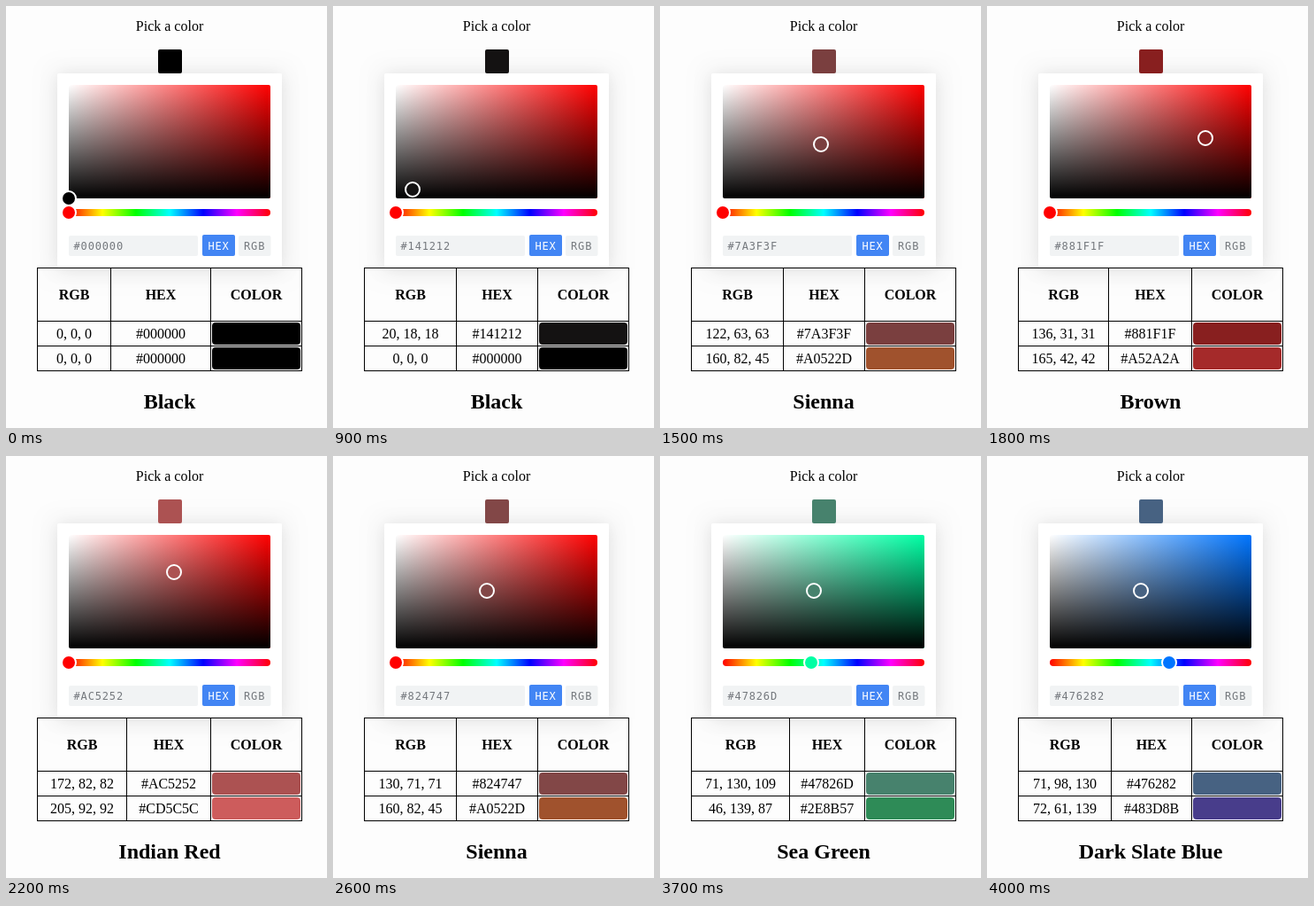
Write an HTML page with a canvas that moves like this. It is 363x476 px and loops after 4100 ms.

```html
<!DOCTYPE html>
<html lang="en">
<head>
<meta charset="utf-8">
<title>Color picker</title>
<style>
  html, body { margin: 0; width: 100%; height: 100%; overflow: hidden; background: #fdfdfd; }
  canvas { display: block; }
</style>
</head>
<body>
<canvas id="stage" width="363" height="476"></canvas>
<script>
const ctx = document.getElementById('stage').getContext('2d');
const LOOP = 4100, STEP = 100;
const SERIF = '"Liberation Serif", "Times New Roman", serif';
const MONO = '"DejaVu Sans Mono", monospace';
const FIELD = { x: 71, y: 89, w: 228, h: 128 };
const HUE_Y = 233;

// [step, saturation, value]
const PATH = [
  [8, 0, 0],
  [13, 41 / 99, 99 / 255],
  [14, 0.39, 0.46],
  [18, 105 / 136, 136 / 255],
  [20, 0.76, 0.62],
  [23, 0.4, 0.7],
  [26, 59 / 130, 130 / 255]
];
// [step, hue in degrees]
const HUES = [
  [32, 0],
  [33, 120 - 60 * 19 / 59],
  [34, 120 - 60 * 19 / 59],
  [37, 120 + 60 * 38 / 59],
  [40, 240 - 60 * 27 / 59]
];
const NAMES = {
  'Black': '#000000', 'Dim Gray': '#696969', 'Gray': '#808080',
  'Dark Slate Gray': '#2F4F4F', 'Slate Gray': '#708090',
  'Maroon': '#800000', 'Dark Red': '#8B0000', 'Brown': '#A52A2A',
  'Fire Brick': '#B22222', 'Indian Red': '#CD5C5C', 'Rosy Brown': '#BC8F8F',
  'Sienna': '#A0522D', 'Saddle Brown': '#8B4513',
  'Dark Olive Green': '#556B2F', 'Olive Drab': '#6B8E23',
  'Forest Green': '#228B22', 'Sea Green': '#2E8B57', 'Teal': '#008080',
  'Cadet Blue': '#5F9EA0', 'Steel Blue': '#4682B4',
  'Dark Slate Blue': '#483D8B', 'Midnight Blue': '#191970'
};

function sample(keys, step) {
  if (step <= keys[0][0]) return keys[0].slice(1);
  for (let i = 1; i < keys.length; i++) {
    const [a, b] = [keys[i - 1], keys[i]];
    if (step <= b[0]) {
      const k = (step - a[0]) / (b[0] - a[0]);
      return a.slice(1).map((v, j) => v + (b[j + 1] - v) * k);
    }
  }
  return keys[keys.length - 1].slice(1);
}

function hsvToRgb(h, s, v) {
  return [5, 3, 1].map(n => {
    const k = (n + h / 60) % 6;
    return Math.round(255 * v * (1 - s * Math.max(0, Math.min(k, 4 - k, 1))));
  });
}

const toHex = rgb => '#' + rgb.map(c => c.toString(16).padStart(2, '0')).join('').toUpperCase();
const fromHex = hex => [1, 3, 5].map(i => parseInt(hex.slice(i, i + 2), 16));

function nearestName(rgb) {
  const dist = name => fromHex(NAMES[name]).reduce((sum, c, i) => sum + (c - rgb[i]) ** 2, 0);
  return Object.keys(NAMES).reduce((best, name) => dist(name) < dist(best) ? name : best);
}

function box(x, y, w, h, r, fill) {
  ctx.beginPath();
  ctx.roundRect(x, y, w, h, r);
  ctx.fillStyle = fill;
  ctx.fill();
}

function text(str, x, y, font, color = '#000', align = 'center') {
  ctx.font = font;
  ctx.fillStyle = color;
  ctx.textAlign = align;
  ctx.fillText(str, x, y);
}

function gradient(x0, y0, x1, y1, colors) {
  const g = ctx.createLinearGradient(x0, y0, x1, y1);
  colors.forEach((c, i) => g.addColorStop(i / (colors.length - 1), c));
  return g;
}

function knob(x, y, color) {
  ctx.beginPath();
  ctx.arc(x, y, 8, 0, Math.PI * 2);
  ctx.fillStyle = color;
  ctx.fill();
  ctx.lineWidth = 2;
  ctx.strokeStyle = '#fff';
  ctx.stroke();
}

function panel() {
  const shadow = (blur, dy, alpha) => {
    ctx.save();
    ctx.shadowBlur = blur;
    ctx.shadowOffsetY = dy;
    ctx.shadowColor = `rgba(0,0,0,${alpha})`;
    box(58, 76, 254, 219, 2, '#fff');
    ctx.restore();
  };
  shadow(24, 2.4, 0.1);
  shadow(16, 0, 0.03);
}

function picker(h, s, v, hex) {
  const { x, y, w, h: height } = FIELD;
  const pure = toHex(hsvToRgb(h, 1, 1));
  box(172, 49, 27, 27, 2, hex);
  box(x, y, w, height, 2, gradient(x, 0, x + w, 0, ['#fff', pure]));
  box(x, y, w, height, 2, gradient(0, y, 0, y + height, ['rgba(0,0,0,0)', '#000']));
  box(x, HUE_Y - 4, w, 8, 4, gradient(x, 0, x + w, 0,
    ['#f00', '#ff0', '#0f0', '#0ff', '#00f', '#f0f', '#f00']));
  knob(Math.round(x + w * s), Math.round(y + height * (1 - v)), hex);
  knob(Math.round(x + w * h / 360), HUE_Y, pure);

  box(71, 259, 146, 23, 2, '#f1f3f4');
  box(222, 258, 37, 24, 2, '#4285f4');
  box(263, 259, 36.5, 23, 2, '#f1f3f4');
  ctx.letterSpacing = '0.84px';
  text(hex, 76.5, 275, '12px ' + MONO, '#75797e', 'left');
  text('HEX', 228.4, 275, '12px ' + MONO, '#fff', 'left');
  text('RGB', 269, 275, '12px ' + MONO, '#75797e', 'left');
  ctx.letterSpacing = '0px';
}

// The first two columns share their width in proportion to their widest text.
function table(rows) {
  const body = '16px ' + SERIF, head = 'bold 16px ' + SERIF;
  ctx.font = body;
  const widest = i => 3 + Math.max(...rows.map(r => ctx.measureText(r[i]).width));
  const [a, b] = [widest(0), widest(1)];
  const mid = 35 + Math.round(196 * a / (a + b));
  const cols = [35, mid, 231, 334];
  const center = i => (cols[i] + cols[i + 1] + 1) / 2;

  ctx.fillStyle = '#000';
  cols.forEach(x => ctx.fillRect(x, 295, 1, 117));
  [295, 355, 383, 411].forEach(y => ctx.fillRect(35, y, 300, 1));
  ['RGB', 'HEX', 'COLOR'].forEach((label, i) => text(label, center(i), 331, head));
  rows.forEach((row, n) => {
    const y = 355 + 28 * n;
    row.forEach((cell, i) => text(cell, center(i), y + 20, body));
    box(232, y + 1, 102, 27, 0, '#fff');
    box(233, y + 2, 100, 25, 4, row[1]);
  });
}

function draw(ms) {
  const step = Math.floor((ms % LOOP) / STEP);
  const [h] = sample(HUES, step);
  const [s, v] = sample(PATH, step);
  const rgb = hsvToRgb(h, s, v);
  const name = nearestName(rgb);
  const row = c => [c.join(', '), toHex(c)];

  ctx.fillStyle = '#fdfdfd';
  ctx.fillRect(0, 0, 363, 476);
  panel();
  text('Pick a color', 185, 28, '16px ' + SERIF);
  picker(h, s, v, toHex(rgb));
  table([row(rgb), row(fromHex(NAMES[name]))]);
  text(name, 185, 454, 'bold 24px ' + SERIF);
}

const start = performance.now();
function frame() {
  draw(performance.now() - start);
  requestAnimationFrame(frame);
}
frame();
</script>
</body>
</html>
```
